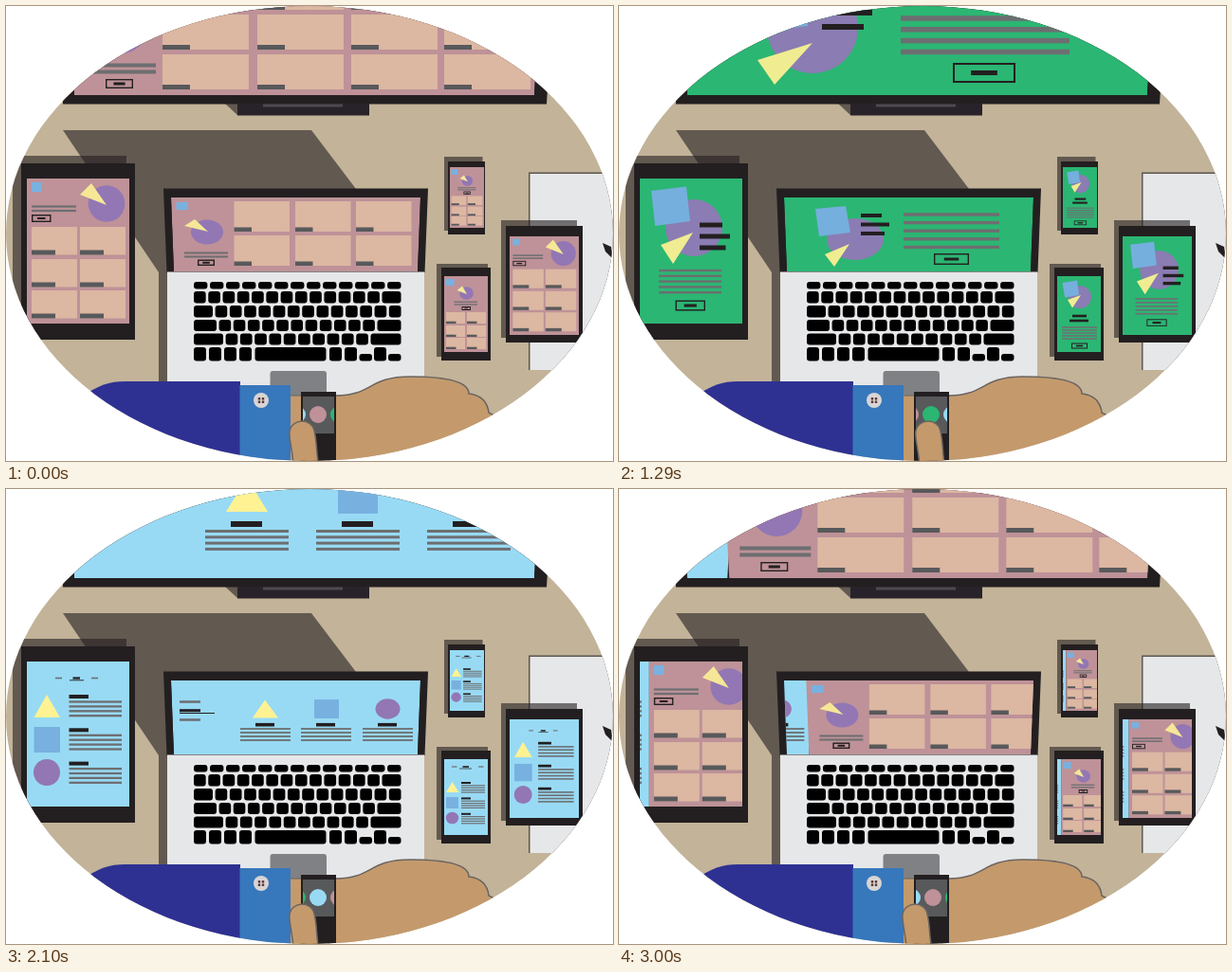
An HTML page with a canvas for the animation above (3030 ms loop, 640 px wide and 480 px high).

```html
<!DOCTYPE html>
<html lang="en">
<head>
<meta charset="utf-8">
<title>Responsive devices</title>
<style>
html, body { margin: 0; width: 100%; height: 100%; overflow: hidden; background: #fff; }
canvas { display: block; }
</style>
</head>
<body>
<canvas id="stage" width="640" height="480"></canvas>
<script>
const ctx = document.getElementById('stage').getContext('2d');
const LOOP = 3030, STEP = 30;
const INK = '#231f20', GREY = '#6d6e71', SLATE = '#58595b', SKIN = '#c49a6c';
const SHADE = 'rgba(35,31,32,.6)';
const BACK = ['#be9298', '#2bb673', '#98daf4'];
const SWIPES = [750, 1770, 2700], SWIPE_TIME = 330;
const FLICK_TIME = 195, RETURNS = [0, 1110, 2100], RETURN_TIME = 450;

function rect(x1, y1, x2, y2, color) {
  ctx.fillStyle = color;
  ctx.fillRect(x1, y1, x2 - x1, y2 - y1);
}
function bar(x1, x2, y, t, color) {
  rect(x1, y - t / 2, x2, y + t / 2, color);
}
function bars(x1, x2, y, gap, n, t, color = GREY) {
  for (let i = 0; i < n; i++) bar(x1, x2, y + i * gap, t, color);
}
function trace(p) {
  ctx.beginPath();
  for (let i = 0; i < p.length; i += 2) ctx.lineTo(p[i], p[i + 1]);
  ctx.closePath();
}
function poly(color, ...p) {
  trace(p);
  ctx.fillStyle = color;
  ctx.fill();
}
function oval(x, y, rx, ry, color) {
  ctx.beginPath();
  ctx.ellipse(x, y, rx, ry, 0, 0, 7);
  ctx.fillStyle = color;
  ctx.fill();
}
function round(x1, y1, x2, y2, r, color) {
  ctx.beginPath();
  ctx.roundRect(x1, y1, x2 - x1, y2 - y1, r);
  ctx.fillStyle = color;
  ctx.fill();
}
function button(x1, y1, x2, y2, line, dash) {
  ctx.strokeStyle = INK;
  ctx.lineWidth = line;
  ctx.strokeRect(x1 + line / 2, y1 + line / 2, x2 - x1 - line, y2 - y1 - line);
  const mid = (x1 + x2) / 2, half = (x2 - x1) * 0.21;
  bar(mid - half, mid + half, (y1 + y2) / 2, dash, INK);
}
function tiles(xs, ys, w, h, dw, dh) {
  for (const x of xs) for (const y of ys) {
    rect(x, y, x + w, y + h, '#dcb7a2');
    rect(x, y + h - dh, x + dw, y + h, SLATE);
  }
}

const LILAC = '#9277b4', PLUM = '#8b7cb3', SKY = '#78b1e0', LEMON = '#f6e797', LIME = '#f0ec92', SUN = '#fef293';

// Each layout holds the three pages: shop, cover, features
const tv = [
  () => {
    tiles([165, 265, 364, 462], [-33, 9, 51], 91, 37, 29, 5);
    rect(265, 0, 294, 3, SLATE);
    oval(122, 23, 27, 27, LILAC);
    poly(LEMON, 100, -5, 118, -15, 133, 24);
    bars(83, 158, 62.5, 7, 2, 4);
    button(105, 77, 134, 87, 1.4, 3);
  },
  () => {
    oval(204, 23, 48, 48, PLUM);
    poly('#75afdd', 130, -30, 192, -40, 199, 21, 140, 28);
    poly(LIME, 146, 57, 204, 39, 164, 83);
    bar(212, 267, 7, 6, INK);
    bar(214, 258, 22, 6, INK);
    bars(297, 475, 13, 11.8, 4, 5.5);
    button(352, 60, 418, 81, 2, 5);
  },
  () => {
    bar(95, 130, 26, 5, GREY);
    bar(95, 130, 43, 5, INK);
    poly(SUN, 254, -12, 276, 24, 232, 24);
    rect(350, -16, 392, 26, SKY);
    oval(489, 3, 21, 21, LILAC);
    for (const x of [210, 327, 444]) {
      bar(x + 27, x + 60, 37, 6, INK);
      bars(x, x + 88, 44.5, 6.3, 4, 3);
    }
  }
];

const laptop = [
  () => {
    tiles([240.5, 305, 369], [206, 242], 58.5, 32, 18.5, 4.5);
    rect(179.5, 207, 192, 215, SKY);
    oval(212, 238.5, 17, 13, LILAC);
    poly(LEMON, 188, 232, 199, 225, 213, 238);
    bars(188, 234, 260.5, 4, 2, 2);
    button(202, 267.5, 220, 274, 1.4, 2);
  },
  () => {
    oval(249, 246, 30, 22, PLUM);
    poly('#75afdd', 207, 214, 239, 211, 244, 239, 211, 243);
    poly(LIME, 217, 262, 243, 251, 227, 275);
    bar(255, 277, 221, 4, INK);
    bar(255, 285, 230.5, 4, INK);
    bar(255, 280, 240, 4, INK);
    bars(300, 401, 220, 8.6, 5, 3.4);
    button(332, 261, 369, 273, 1.4, 3);
  },
  () => {
    bars(183, 205, 224.5, 19, 2, 2.5);
    bar(183, 205, 233.7, 3, INK);
    bar(183, 220, 236.5, 1, INK);
    poly(SUN, 273, 222.5, 287, 241.5, 260, 241.5);
    rect(325, 222, 351, 242, SKY);
    oval(402.5, 232, 13, 10.7, LILAC);
    for (const x of [247, 311, 376]) {
      bar(x + 16, x + 36, 248.7, 3.6, INK);
      bars(x, x + 53, 253, 4, 4, 1.8);
    }
  }
];

const tablet = [
  () => {
    tiles([27, 78], [233, 267, 300], 48, 29.5, 25, 5);
    rect(27, 186, 37.5, 196, SKY);
    oval(106, 208.5, 19.3, 19.3, LILAC);
    poly(LEMON, 78, 199, 90, 187, 106, 210);
    bars(27, 74, 211.5, 4.5, 2, 2.2);
    button(27, 220, 47.5, 228, 1.4, 2);
  },
  () => {
    oval(79, 234, 30, 30, PLUM);
    poly('#75afdd', 34, 195, 71, 190.5, 75, 227, 38, 232);
    poly(LIME, 44, 252, 78, 239, 57, 272);
    bar(85, 109, 231, 5, INK);
    bar(85, 117, 243, 5, INK);
    bar(85, 112.5, 255, 5, INK);
    bars(42, 108, 279, 5.8, 5, 2.4);
    button(59.5, 310.5, 91, 321.5, 1.4, 3);
  },
  () => {
    bar(52, 59, 199.5, 1.6, GREY);
    bar(90, 97, 199.5, 1.6, GREY);
    bar(70.5, 78, 199.5, 2.2, INK);
    bar(67, 82, 201.8, 0.9, INK);
    poly(SUN, 43, 217, 57, 241, 29.5, 241);
    rect(29.5, 251, 57, 278, SKY);
    oval(43, 299, 14, 14, LILAC);
    for (let i = 0; i < 3; i++) {
      const y = 219 + i * 35.3;
      bar(66.5, 87, y, 4, INK);
      bars(66.5, 122, y + 5.5, 4.9, 4, 2.3);
    }
  }
];

const phone = [
  () => {
    tiles([464, 486], [323, 337, 350], 20, 12, 10.5, 2.3);
    rect(464, 288, 472.5, 295, SKY);
    oval(485.5, 303, 7.3, 6.8, LILAC);
    poly(LEMON, 475.5, 300, 481, 295.5, 486, 304);
    bars(472.5, 497, 312.2, 2.7, 2, 1.3);
    button(480.5, 317, 490, 321, 1, 1);
  },
  () => {
    oval(486, 307, 12, 12, PLUM);
    poly('#75afdd', 467.5, 292, 483, 289.5, 485, 305, 470, 307.5);
    poly(LIME, 473, 310, 487, 305, 478, 318.5);
    bar(478, 493, 327, 2.6, INK);
    bar(475, 495, 332, 2.6, INK);
    bars(467, 504, 339, 3, 5, 1.5);
    button(477, 355.5, 494, 361.5, 1, 1.6);
  },
  () => {
    bar(470, 475.5, 293, 1.2, GREY);
    bar(498, 503.5, 293, 1.2, GREY);
    bar(481.5, 488, 293, 1.6, INK);
    bar(478, 491, 295, 0.7, INK);
    poly(SUN, 470.5, 309, 477.5, 320, 464, 320);
    rect(464, 325, 477, 337, SKY);
    oval(470.5, 347, 6.7, 6.3, LILAC);
    for (let i = 0; i < 3; i++) {
      const y = 310 + i * 16.4;
      bar(480, 490, y, 2, INK);
      bars(480, 505, y + 2.8, 2.4, 4, 1.2);
    }
  }
];

function screen(pages, area, pitch, state) {
  ctx.save();
  trace(area);
  ctx.clip();
  const show = (n, dx) => {
    ctx.save();
    ctx.translate(dx, 0);
    poly(BACK[n], ...area);
    pages[n]();
    ctx.restore();
  };
  show(state.page, -pitch * state.slide);
  if (state.moving) show((state.page + 1) % 3, pitch * (1 - state.slide));
  ctx.restore();
}

function box(x1, y1, x2, y2) { return [x1, y1, x2, y1, x2, y2, x1, y2]; }

// Draws a portrait screen scaled from its base layout
function scaled(pages, area, pitch, x, y, kx, ky, state) {
  ctx.save();
  ctx.translate(x, y);
  ctx.scale(kx, ky);
  ctx.translate(-area[0], -area[1]);
  screen(pages, area, pitch, state);
  ctx.restore();
}

function keyRow(y1, y2, first, last, n) {
  const left = 198, right = 416.5, gap = 2.6;
  const key = (a, b) => round(a, y1, b, y2, 3, '#000');
  let a = left, b = right;
  if (first) { key(left, left + first); a += first + gap; }
  if (last) { key(right - last, right); b -= last + gap; }
  const w = (b - a + gap) / n;
  for (let i = 0; i < n; i++) key(a + i * w, a + (i + 1) * w - gap);
}

function keyboard() {
  keyRow(291, 298.5, 0, 0, 13);
  keyRow(301, 313.5, 0, 20, 13);
  keyRow(316, 328.5, 20, 0, 13);
  keyRow(331, 343, 24, 25, 11);
  keyRow(345.5, 357.5, 31, 32, 10);
  for (const x of [198, 214, 230, 246, 341, 357]) round(x, 360, x + 13, 374.5, 3, '#000');
  round(262.5, 360, 337.5, 374.5, 3, '#000');
  round(372.5, 367, 386, 374.5, 3, '#000');
  round(388, 360, 401, 374.5, 3, '#000');
  round(403, 367, 416.5, 374.5, 3, '#000');
}

function outlined(path) {
  ctx.fillStyle = SKIN;
  ctx.strokeStyle = '#6b6460';
  ctx.lineWidth = 1.5;
  ctx.fill(path);
  ctx.stroke(path);
}

const hand = new Path2D('M340 411H348C386 411 382 391 426 391C466 391 488 397 488 409C504 411 508 420 509 429L530 440V490H340Z');
const thumb = new Path2D('M303 484C302 468 298 456 299 449C301 435 322 434 325 448C328 460 327 470 329.500 484');

function watch(state) {
  rect(311, 407, 348, 480, INK);
  ctx.save();
  ctx.beginPath();
  ctx.rect(313, 412, 33, 39);
  ctx.clip();
  rect(313, 412, 346, 451, SLATE);
  for (let i = -1; i <= 2; i++) {
    oval(329 + (i - state.slide) * 22, 431, 9, 9, BACK[(state.page + i + 3) % 3]);
  }
  ctx.restore();
}

function arm(state) {
  outlined(hand);
  rect(299, 411, 312, 480, SKIN);
  rect(299, 410.5, 312, 411.5, '#6b6460');
  ctx.fillStyle = '#2e3192';
  ctx.fill(new Path2D('M80 412C98 400 108 396 126 396H247V480H80Z'));
  rect(246.500, 400, 300, 480, '#3777bc');
  oval(269, 416, 8, 8, '#d8d5d5');
  for (const x of [267, 271]) bars(x - 1.2, x + 1.2, 414.3, 3.4, 2, 2.4, '#59302f');
  watch(state);
  ctx.save();
  ctx.translate(state.thumb, 0);
  outlined(thumb);
  ctx.restore();
}

const tvArea = [67, 0, 562, 0, 557, 94, 72, 94];
const laptopArea = [174, 202, 437, 202, 434, 280, 177, 280];
const tabletArea = box(22, 182, 130, 335);
const phoneArea = box(462, 285, 508, 365);

function scene(state) {
  rect(0, 0, 640, 480, '#fff');
  ctx.save();
  ctx.beginPath();
  ctx.ellipse(320, 240, 320, 240, 0, 0, 7);
  ctx.clip();
  rect(0, 0, 640, 480, '#c2b399');

  poly(SHADE, 231, 103, 244, 103, 244, 115);
  poly(INK, 54, 0, 576, 0, 570, 103.500, 60, 103.500);
  rect(244, 103, 383, 115.500, '#28232a');
  rect(271, 103.500, 355, 106.500, '#4d4a4f');
  screen(tv, tvArea, 487, state);

  poly(SHADE, 60, 131, 322, 131, 369, 193, 369, 240, 170, 281, 170, 410, 161, 410, 161, 281);
  rect(7, 158, 127, 344, SHADE);
  rect(16, 166, 136, 352, INK);
  screen(tablet, tabletArea, 108, state);

  poly(INK, 166, 192.500, 445, 192.500, 441.500, 281, 169.500, 281);
  screen(laptop, laptopArea, 257, state);
  rect(170, 280.500, 441, 420, '#e6e7e9');
  keyboard();
  round(278.500, 385, 338, 414, 3, '#808184');

  rect(551, 175.500, 640, 384, '#5c564f');
  rect(552.500, 177, 640, 384, '#e6e7e9');
  poly(INK, 629, 250, 638, 254, 640, 267, 632, 259);

  rect(462, 159, 502.500, 237, SHADE);
  rect(466, 164, 505, 241, INK);
  scaled(phone, phoneArea, 46, 468, 170, 36 / 46, 0.8, state);

  rect(454, 272, 508, 370, SHADE);
  rect(459, 276, 511, 374, INK);
  screen(phone, phoneArea, 46, state);

  rect(522, 226, 602, 350, SHADE);
  rect(527, 232, 608, 355, INK);
  scaled(tablet, tabletArea, 108, 531, 243, 73 / 108, 104 / 153, state);

  arm(state);
  ctx.restore();
}

function ramp(t, start, span) {
  return Math.min(1, Math.max(0, (t - start) / span));
}

function stateAt(t) {
  let page = 0, slide = 0, moving = false, reach = 0;
  for (let i = 0; i < 3; i++) {
    const u = ramp(t, SWIPES[i], SWIPE_TIME);
    if (u === 1) page = (i + 1) % 3;
    else if (t >= SWIPES[i]) { moving = true; slide = u; }
    reach += ramp(t, RETURNS[i], RETURN_TIME) - ramp(t, SWIPES[i], FLICK_TIME);
  }
  return { page, slide, moving, thumb: reach * 34.5 };
}

function frame() {
  const t = performance.now() % LOOP;
  scene(stateAt(Math.floor(t / STEP) * STEP));
  requestAnimationFrame(frame);
}
frame();
</script>
</body>
</html>
```
